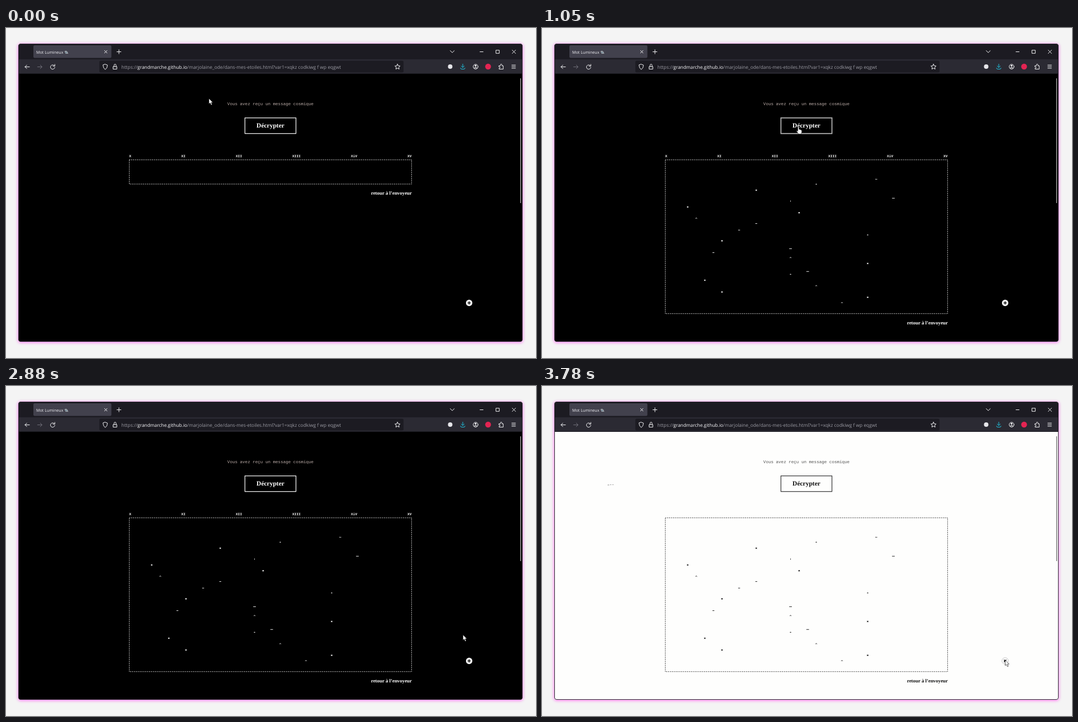
These frames come from a looping animation (948 by 590 pixels, 3810 ms). An HTML page:

```html
<!DOCTYPE html>
<html lang="fr">
<head>
<meta charset="utf-8">
<title>Message</title>
<style>
html, body { margin: 0; width: 948px; height: 590px; overflow: hidden; background: #f4f4f4; }
#glow { position: absolute; left: 22px; top: 28px; width: 902px; height: 533px; border-radius: 4px; box-shadow: 0 1px 5px 1px #ff8cf2; }
svg { position: absolute; left: 0; top: 0; --ink: #fff; --paper: #000; --soft: #b9aaa6; --bar: #b5b5b5; --edge: #fff; }
svg.light { --ink: #111; --paper: #fefefd; --soft: #555; --bar: #6a6a6a; --edge: #333; }
text { text-rendering: geometricPrecision; white-space: pre; }
.ui { font-family: "Open Sans", "Noto Sans", sans-serif; }
.mono { font-family: "Liberation Mono", monospace; }
.gothic { font-family: "Liberation Serif", serif; font-weight: bold; fill: var(--ink); }
.icon { fill: none; stroke: #f4f4f6; stroke-width: 1; stroke-linecap: round; stroke-linejoin: round; }
#stars { fill: none; stroke: var(--ink); stroke-width: .9; }
</style>
</head>
<body>
<div id="glow"></div>
<svg id="stage" width="948" height="590" viewBox="0 0 948 590">
  <!-- browser window -->
  <rect x="22.5" y="28.5" width="901" height="532" rx="3.5" fill="var(--paper)"/>
  <path d="M22.5 82V32q0-3.5 3.5-3.5h894q3.5 0 3.5 3.5v50z" fill="#1c1b22"/>
  <path d="M22.5 56h901v25h-901z" fill="#2b2a33"/>
  <rect x="49" y="31" width="139.5" height="22.5" rx="2.2" fill="#42414d"/>
  <rect x="167" y="58.5" width="544" height="21" rx="2.2" fill="#1c1b22"/>
  <rect x="22.5" y="28.5" width="901" height="532" rx="3.5" fill="none" stroke="#2a2730"/>
  <g class="ui">
    <text x="54" y="45.5" font-size="7.2" fill="#f0f0f4">Mot Lumineux</text>
    <text x="206.5" y="72.5" font-size="8.4" fill="#9b9ba3">https://<tspan fill="#fbfbfe">grandmarche.github.io</tspan>/marjolaine_ode/dans-mes-etoiles.html?var1=xqkz codkiwg f wp eqgwt</text>
  </g>
  <path d="M104.500 41.500l3-1 2.500 2 1.500 3.500h-5z" fill="#9aa0a6"/>
  <path d="M106.500 43h2v1.500h-2z" fill="#5b7f95"/>
  <g class="icon">
    <path d="M176.2 40.2l4.6 4.6m0-4.6l-4.6 4.6M198.300 42.500h7.400m-3.700-3.700v7.400M794.500 40.500l3.700 3.500 3.700-3.500M847.800 42.500h5.600M876.700 39.700h5.600v5.600h-5.600zM905.500 39.500l6 6m0-6l-6 6"/>
    <path d="M42 69.500h-8m3.300-3.300l-3.300 3.300 3.300 3.300"/>
    <path d="M56.500 69.500h8m-3.300-3.300l3.300 3.300-3.300 3.300" stroke="#6f6e78"/>
    <path d="M86.300 67.200a3.900 3.900 0 1 0 1 3.200M87.300 65v3.200h-3.200"/>
    <path d="M177.500 64.800l4 1.500q0 5.300-4 8-4-2.700-4-8z"/>
    <path d="M192 69h6.200v4.500h-6.200zM193.300 69v-2.300q0-2 1.800-2t1.800 2v2.300"/>
    <path d="M700.300 64.600l1.400 3 3.300.4-2.500 2.200.7 3.300-2.900-1.700-2.900 1.700.7-3.300-2.500-2.200 3.300-.4z"/>
    <path d="M817 64.500v6m-2.800-2.600l2.800 2.700 2.800-2.700M813 71.500q0 2 2 2h4q2 0 2-2" stroke="#1fc3e0"/>
    <circle cx="840" cy="69.200" r="4.300"/>
    <path d="M838.800 67.500a1.200 1.200 0 1 1 2.400 0 1.200 1.200 0 0 1-2.400 0M837.500 71.500q2.500-2 5 0" fill="#f4f4f6"/>
    <path d="M882 67.500h2.300v-1.300q0-1.700 1.400-1.700t1.400 1.700v1.300h2.200v6h-7.300v-1.800q1.900 0 1.900-1.200t-1.900-1.200z"/>
    <path d="M904.700 66.300h6.600m-6.600 2.800h6.600m-6.600 2.800h6.600"/>
  </g>
  <circle cx="794.500" cy="69" r="4" fill="#e6e6ea"/>
  <circle cx="862.300" cy="69" r="5.200" fill="#e32452"/>

  <!-- page -->
  <path d="M920.500 90v223" stroke="var(--bar)" stroke-width="1.300"/>
  <text class="mono" x="473" y="137.500" font-size="7.570" text-anchor="middle" fill="var(--soft)">Vous avez reçu un message cosmique</text>
  <text class="mono" x="117.500" y="178.300" font-size="6.200" fill="#000">←--</text>
  <rect id="button" x="427.400" y="160.700" width="91.200" height="28" fill="none"/>
  <text class="gothic" x="473" y="178.300" font-size="11.500" text-anchor="middle">Décrypter</text>
  <g id="scale" class="mono" font-size="6.200" font-weight="bold" fill="#fff"></g>
  <rect id="frame" x="220.500" y="235.700" width="505" fill="none" stroke="var(--ink)" stroke-width=".9" stroke-dasharray="1.700"/>
  <g id="stars"></g>
  <text id="reply" class="gothic" x="726" font-size="8.900" text-anchor="end">retour à l’envoyeur</text>
  <g transform="translate(828.400 491.500)">
    <circle id="disc" r="5.700" fill="#fff"/>
    <path id="plus" d="M-2.900 0h5.800M0-2.900v5.800" stroke="#000" stroke-width="1.400"/>
  </g>
  <g id="cursor" fill="#fff" stroke="#000" stroke-width=".6" stroke-linejoin="round">
    <path id="arrow" d="M0 0V9.800L2.200 7.800 3.900 11.700 5.700 10.900 4 7.200H7z"/>
    <path id="hand" d="M-1.100 1Q-1.100-.3 0-.3T1.100 1V4.200Q2.400 3.500 3 4.700 4.300 4.200 4.700 5.300 6 5.200 6 6.500V9Q6 10.500 4.900 11.500V12.500H-.3V11.600L-3.200 7.700Q-3.500 6.500-2.300 6.500L-1.100 7.600z"/>
  </g>
</svg>
<script>
const LOOP = 3810, OPEN = 570, FLIP = 3500;
const $ = id => document.getElementById(id);

$('scale').innerHTML = [['X', 220.3], ['XI', 313.5], ['XII', 411], ['XIII', 512], ['XiV', 617], ['XV', 718]]
  .map(([s, x]) => `<text x="${x}" y="231">${s}</text>`).join('');

const GLYPHS = {
  '*': 'M-1.4 0h2.8M-.8-1.2l1.6 2.4M.8-1.2l-1.6 2.4',
  '^': 'M-1.5.7L0-.5 1.5.7',
  '-': 'M-1.7 0h3.4',
  '_': 'M-2.4 0h4.8',
  '~': 'M-1.7.2q.9-.8 1.7-.2t1.7-.1',
  "'": 'M0-1v2',
  '.': 'M-1.2 0h2.4M0-.6v1'
};
// each entry: glyph, column, y
const SKY = "*0,320 ^1,340 *2,451 -3,401.6 *4,380.5 *4,472 -6,361.3 *8,290 -8,349.6 '12,309.5 _12,394.6 ^12,410.4 " +
  ".12,440.4 *13,330.3 _14,435.3 .15,279.3 ^15,460.7 ^18,491 .21,370 *21,421 *21,481.5 ~22,270.4 _24,304.3";
$('stars').innerHTML = SKY.split(' ').map(s => {
  const [col, y] = s.slice(1).split(',');
  return `<path transform="translate(${260.6 + col * 15.33} ${y})" d="${GLYPHS[s[0]]}"/>`;
}).join('');

// pointer path: time, x, y
const PATH = [
  [0, 363, 126], [480, 458.5, 177], [1030, 458.5, 177], [1560, 538, 219], [2100, 783, 301],
  [2250, 801, 371], [2570, 801, 371], [3090, 827.5, 488], [3300, 828.5, 490], [LOOP, 828.5, 490]
];
const slope = (i, k) => (PATH[i + 1][k] - PATH[i][k]) / (PATH[i + 1][0] - PATH[i][0]);
const tangent = (i, k) => {
  if (i === 0 || i === PATH.length - 1) return 0;
  const a = slope(i - 1, k), b = slope(i, k);
  return a * b > 0 ? 2 * a * b / (a + b) : 0;
};
// smooth interpolation that never overshoots its points
function pointer(t, k) {
  let i = 0;
  while (t >= PATH[i + 1][0]) i++;
  const span = PATH[i + 1][0] - PATH[i][0], u = (t - PATH[i][0]) / span, v = 1 - u;
  return v * v * (1 + 2 * u) * PATH[i][k] + u * u * (3 - 2 * u) * PATH[i + 1][k]
    + span * u * v * (v * tangent(i, k) - u * tangent(i + 1, k));
}

const set = (id, attrs) => { for (const a in attrs) $(id).setAttribute(a, attrs[a]); };
const show = (id, on) => set(id, { visibility: on ? 'visible' : 'hidden' });

function draw(t) {
  const x = pointer(t, 1), y = pointer(t, 2);
  const hover = x > 427 && x < 519 && y > 160.5 && y < 189;
  const open = t >= OPEN, light = t >= FLIP;
  const turn = Math.min(1, Math.max(0, (t - 3030) / 200));

  $('stage').classList.toggle('light', light);
  set('button', { stroke: hover ? '#bbb' : 'var(--edge)', 'stroke-width': hover ? 1.7 : 1.2 });
  set('frame', { height: open ? 275 : 43.3 });
  set('reply', { y: open ? 529.5 : 298 });
  show('stars', open);
  set('plus', { transform: `rotate(${45 * turn})` });
  set('disc', { stroke: light ? '#aaa' : 'none', 'stroke-width': .7 });
  set('cursor', { transform: `translate(${x} ${y})` });
  show('arrow', !hover);
  show('hand', hover);
}

let start;
function tick(now) {
  start ??= now;
  draw((now - start) % LOOP);
  requestAnimationFrame(tick);
}
draw(0);
requestAnimationFrame(tick);
</script>
</body>
</html>
```
